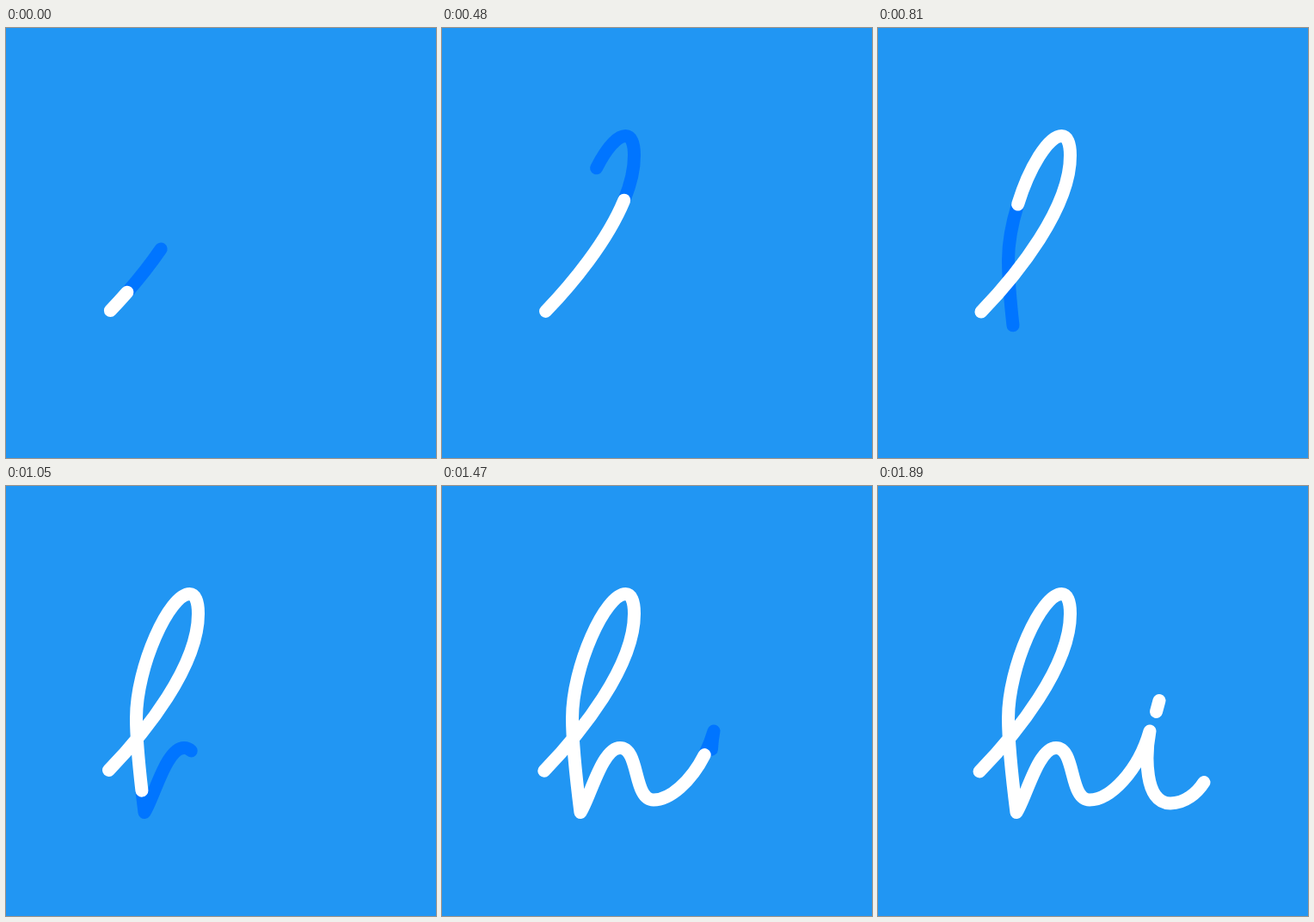
These frames come from a looping animation (500 by 500 pixels, 2430 ms). An HTML page:

```html
<!DOCTYPE html>
<html lang="en">
<head>
<meta charset="utf-8">
<title>hi</title>
<style>
  html, body { margin: 0; width: 100%; height: 100%; overflow: hidden; background: #2196f3; }
  svg { display: block; width: 100%; height: 100%; }
  path { fill: none; stroke-width: 15; stroke-linecap: round; stroke-linejoin: round; }
  .lead { stroke: #0075ff; }
  .ink { stroke: #fff; }
</style>
</head>
<body>
<svg viewBox="0 0 500 500">
  <g class="lead"></g>
  <g class="ink"></g>
</svg>
<script>
const LOOP = 2430, STEP = 30, DRAWN = 1890, START_TRIM = 5;

const WORD = `M118 332 C160 289 224 210 223.5 148 C223.5 134 220 125.5 213.5 125.5
  C190 125.5 151.5 210 151.5 270 C151.5 300 157 348 161 379.5
  C172 363 186 304.5 207 304.5 C230 304.5 222 365 246 365
  C270 365 303 331 316 285 C311 312 309 369 340 369 C357 369 371 357 379 344.5`;
const DOT = 'M327 249.5 L323.5 262.5';

function addStrokes(group) {
  let begin = 0;
  return [WORD, DOT].map(d => {
    const el = document.createElementNS('http://www.w3.org/2000/svg', 'path');
    el.setAttribute('d', d);
    document.querySelector(group).append(el);
    const stroke = { el, begin, length: el.getTotalLength() };
    begin += stroke.length;
    return stroke;
  });
}

const lead = addStrokes('.lead');
const ink = addStrokes('.ink');
const total = ink[1].begin + ink[1].length;

// Length along the word at the spot closest to (x, y)
function lengthAt(x, y) {
  let best = 0, nearest = Infinity;
  for (let s = 0; s <= ink[0].length; s += 0.5) {
    const p = ink[0].el.getPointAtLength(s);
    const gap = Math.hypot(p.x - x, p.y - y);
    if (gap < nearest) { nearest = gap; best = s; }
  }
  return best;
}

// Smooth curve of length over time through [time, x, y] keys
function makeHead(keys) {
  const pts = keys.map(([t, x, y]) => [t, lengthAt(x, y)]);
  pts.push([DRAWN, total]);
  const last = pts.length - 1;
  const slopes = pts.map((_, i) => {
    const a = pts[Math.max(i - 1, 0)], b = pts[Math.min(i + 1, last)];
    return (b[1] - a[1]) / (b[0] - a[0]);
  });
  return t => {
    let i = 0;
    while (i < last - 1 && t >= pts[i + 1][0]) i++;
    const [t0, s0] = pts[i], [t1, s1] = pts[i + 1];
    const h = t1 - t0, u = (t - t0) / h, v = 1 - u;
    return s0 * v * v * (1 + 2 * u) + s1 * u * u * (3 - 2 * u)
      + h * u * v * (slopes[i] * v - slopes[i + 1] * u);
  };
}

const inkHead = makeHead([
  [0, 141, 307], [240, 165, 278], [480, 211, 200],
  [810, 163, 205], [1050, 158, 354], [1470, 305, 313]
]);
const leadHead = makeHead([
  [0, 180, 257], [240, 214, 192], [480, 180, 163], [810, 156.5, 345.5],
  [1050, 215, 308], [1470, 313.5, 306], [1620, 321.5, 357]
]);

function trim(strokes, from, to) {
  for (const { el, begin, length } of strokes) {
    const a = Math.max(from - begin, 0);
    const b = Math.min(to - begin, length);
    el.style.display = b > a ? '' : 'none';
    el.style.strokeDasharray = `${Math.max(b - a, 0.01)} 9999`;
    el.style.strokeDashoffset = -a;
  }
}

function draw() {
  const now = performance.now() % LOOP;
  const t = Math.min(Math.floor(now / STEP) * STEP, DRAWN);
  const tip = inkHead(t);
  trim(ink, START_TRIM * (1 - t / DRAWN), tip);
  trim(lead, tip, leadHead(t));
  requestAnimationFrame(draw);
}
draw();
</script>
</body>
</html>
```
